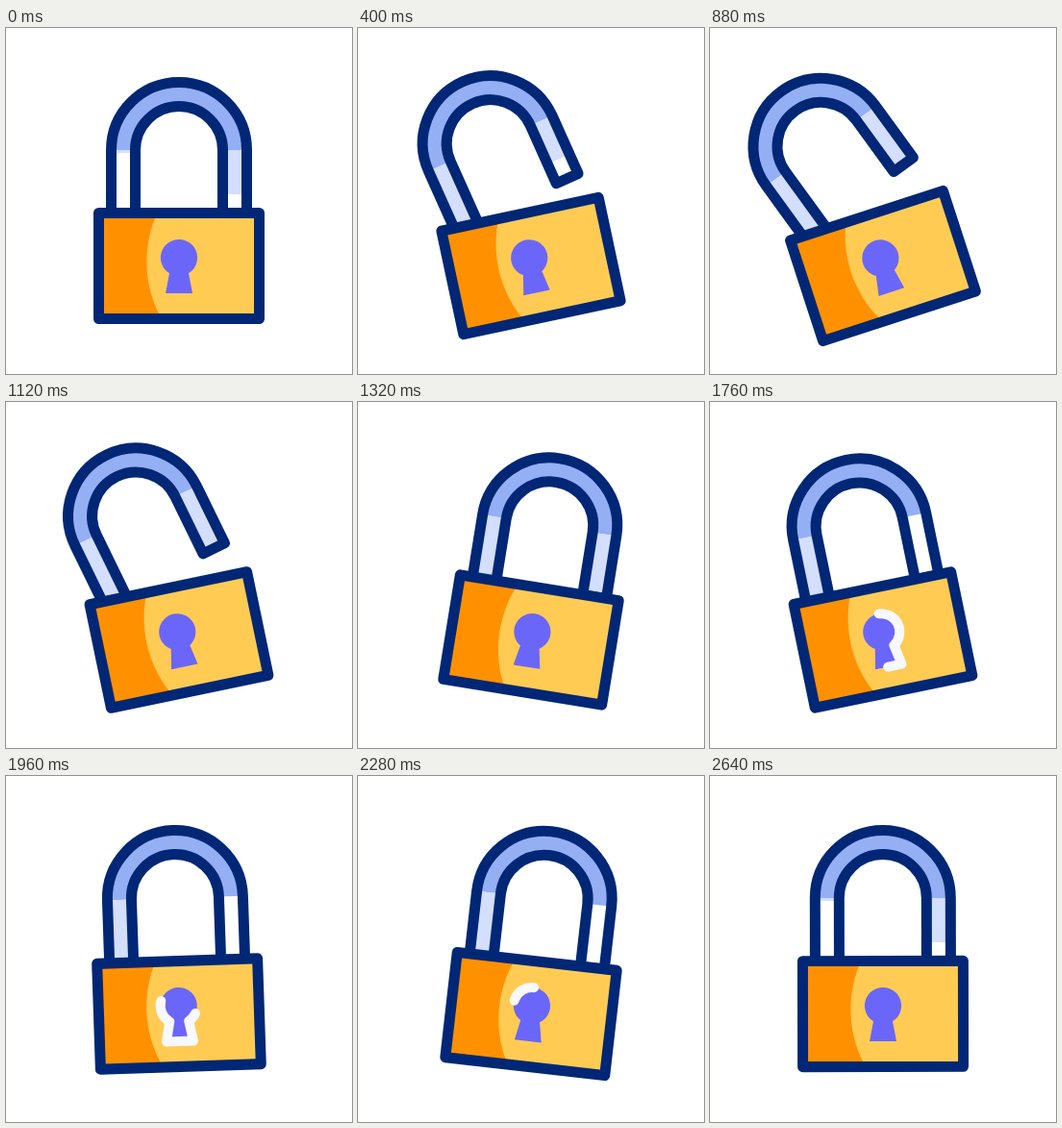
These frames come from a looping animation (360 by 360 pixels, 3 s). An HTML page with a canvas:

```html
<!DOCTYPE html>
<html lang="en">
<head>
<meta charset="utf-8">
<title>Padlock</title>
<style>
  html, body { margin: 0; height: 100%; overflow: hidden; background: #fff; }
  canvas { display: block; width: 360px; height: 360px; }
</style>
</head>
<body>
<canvas id="stage" width="360" height="360"></canvas>
<script>
const ctx = document.getElementById('stage').getContext('2d');
const LOOP = 3000;
const NAVY = '#002775', BLUE = '#94aff4', PALE = '#d4defd';
const GOLD = '#ffcb53', ORANGE = '#ff9100', VIOLET = '#6b66fa';

const shackle = new Path2D('M109.5 210V127A70.5 70.5 0 0 1 250.5 127V193H225.5V127A45.5 45.5 0 0 0 134.5 127V210Z');
const body = new Path2D('M96.5 192.5H263.5V302.5H96.5Z');
const shade = new Path2D('M97 193H155V198C143 228 143 265 159 297V302H97Z');
const keyhole = new Path2D('M180 220A19 19 0 0 1 190 255.2L194 276H166L170 255.2A19 19 0 0 1 180 220Z');
const KEYHOLE_LENGTH = 169;
const sparks = [[283, 188, 297, 174], [292, 201, 314, 194], [297, 215, 321, 220]];

const progress = (t, from, to) => Math.min(1, Math.max(0, (t - from) / (to - from)));
const ease = (t, from, to) => (1 - Math.cos(Math.PI * progress(t, from, to))) / 2;
const easeOut = (t, from, to) => 1 - (1 - progress(t, from, to)) ** 3;
const mix = (a, b, p) => a + (b - a) * p;

// Swing of the whole lock after it opens: [start, end, change in degrees]
const swings = [[1000, 1400, 30], [1400, 1720, -24], [1720, 2200, 20], [2200, 2520, -10], [2520, 2660, 2]];
const tilt = t => swings.reduce((sum, [from, to, turn]) => sum + turn * ease(t, from, to), -18 * easeOut(t, 200, 850));
const opening = t => -18 * (easeOut(t, 200, 850) - ease(t, 1030, 1335));

// Lower ends of the tinted part of the left and right legs
function tintEnds(t) {
  if (t < 200 || t >= 2600) return [130, 173];
  if (t < 600) return [210, 171];
  if (t < 1440) return [210, 193];
  if (t < 1720) return [150, 156];
  return [210, 127];
}

function rotate(degrees, x, y) {
  ctx.translate(x, y);
  ctx.rotate(degrees * Math.PI / 180);
  ctx.translate(-x, -y);
}

function fill(path, color) {
  ctx.fillStyle = color;
  ctx.fill(path);
}

function stroke(path, color, width) {
  ctx.strokeStyle = color;
  ctx.lineWidth = width;
  ctx.stroke(path);
}

function leg(x, tintEnd) {
  ctx.fillStyle = '#fff';
  ctx.fillRect(x, 127, 25, x < 180 ? 83 : 66);
  ctx.fillStyle = PALE;
  ctx.fillRect(x, 127, 25, tintEnd - 127);
}

function drawShackle(t) {
  const [left, right] = tintEnds(t);
  ctx.save();
  rotate(opening(t), 112, 190);
  fill(shackle, BLUE);
  leg(109.5, left);
  leg(225.5, right);
  stroke(shackle, NAVY, 11);
  ctx.restore();
}

function drawGlint(t) {
  const head = KEYHOLE_LENGTH * ease(t, 1360, 2160);
  const tail = KEYHOLE_LENGTH * ease(t, 1720, 2480);
  if (head - tail < 0.1) return;
  ctx.setLineDash([head - tail, 999]);
  ctx.lineDashOffset = -tail;
  stroke(keyhole, '#f7f9fe', 10);
  ctx.setLineDash([]);
}

function drawSparks(t) {
  const head = ease(t, 1360, 1540), tail = ease(t, 1440, 1680);
  if (head <= tail) return;
  for (const [x1, y1, x2, y2] of sparks) {
    const line = new Path2D();
    line.moveTo(mix(x1, x2, tail), mix(y1, y2, tail));
    line.lineTo(mix(x1, x2, head), mix(y1, y2, head));
    stroke(line, '#f8c751', 10);
  }
}

function draw(t) {
  ctx.fillStyle = '#fff';
  ctx.fillRect(0, 0, 360, 360);
  ctx.lineJoin = ctx.lineCap = 'round';
  ctx.save();
  rotate(tilt(t), 180, 247.5);
  drawShackle(t);
  fill(body, GOLD);
  fill(shade, ORANGE);
  stroke(body, NAVY, 11);
  fill(keyhole, VIOLET);
  drawGlint(t);
  ctx.restore();
  drawSparks(t);
}

const start = performance.now();
function tick() {
  draw((performance.now() - start) % LOOP);
  requestAnimationFrame(tick);
}
tick();
</script>
</body>
</html>
```
